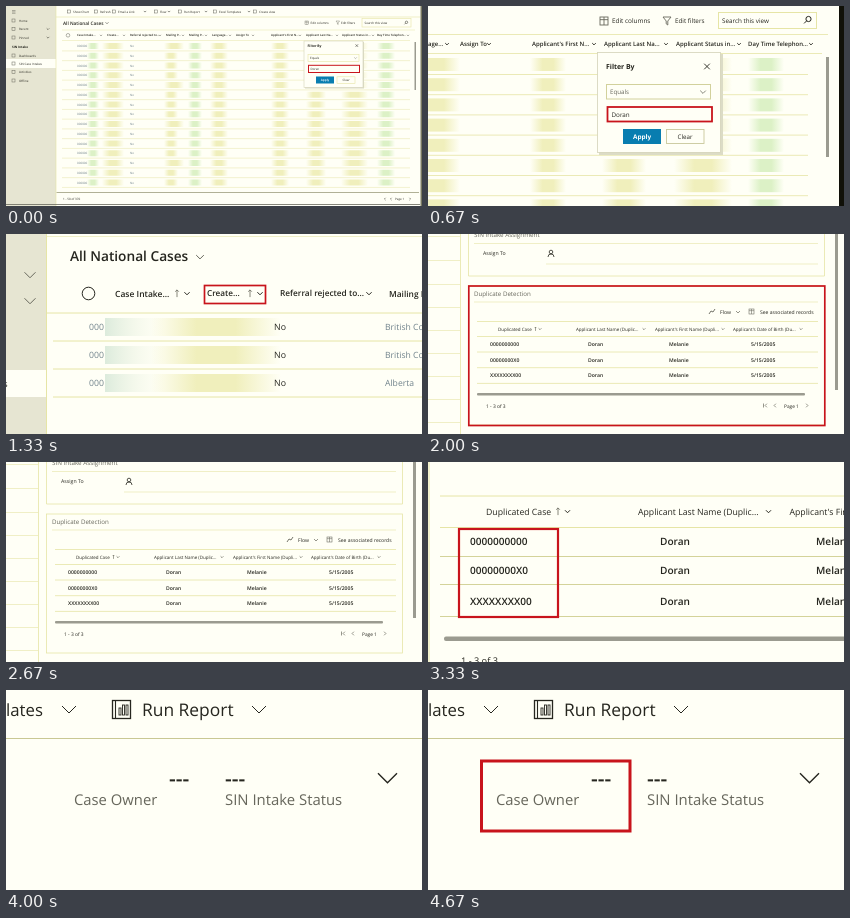
Animation of 416x200 px, one loop 5340 ms. Source, as an HTML page:

```html
<!DOCTYPE html>
<html lang="en">
<head>
<meta charset="utf-8">
<title>Case intake walkthrough</title>
<style>
html, body { margin: 0; width: 100%; height: 100%; overflow: hidden; background: #fffff6; }
svg { display: block; width: 416px; height: 200px; }
text { font-family: "Open Sans", "Noto Sans", sans-serif; text-rendering: geometricPrecision; white-space: pre; }
.on { opacity: 0; animation: 5340ms step-end infinite; }
.one { animation-name: one; }
.two { animation-name: two; }
@keyframes one { 0% { opacity: 1; } 12.547%, 100% { opacity: 0; } }
@keyframes two { 0% { opacity: 1; } 25.094%, 100% { opacity: 0; } }
</style>
</head>
<body>
<svg id="stage" viewBox="0 0 416 200"></svg>
<script>
const LOOP = 5340;
const PAGE = '#fffff6', INK = '#26261f', SOFT = '#67675c', SLATE = '#71838c', RULE = '#e6e5a6', TINT = '#e6e5d2';
const RED = '#c8141c', TEAL = '#087db0', BAR = '#9b9b90';
const LAST = 'Doran', FIRST = 'Melanie';

const rect = (x, y, w, h, fill, extra = '') =>
  `<rect x="${x}" y="${y}" width="${w}" height="${h}" fill="${fill}" ${extra}/>`;
const frame = (x, y, w, h, stroke, width = 1, fill = 'none') =>
  rect(x, y, w, h, fill, `stroke="${stroke}" stroke-width="${width}"`);
const path = (d, stroke = INK, width = 1) =>
  `<path d="${d}" fill="none" stroke="${stroke}" stroke-width="${width}"/>`;
const rule = (x, y, to, color = RULE, width = 1) => path(`M${x} ${y}H${to}`, color, width);
// y is the middle of the line
const text = (x, y, size, str, fill = INK, weight = 400) =>
  `<text x="${x}" y="${(y + size * 0.36).toFixed(2)}" font-size="${size}" fill="${fill}" font-weight="${weight}">${str}</text>`;
const chevron = (x, y, r, color = INK, width = 1) =>
  path(`M${x - r} ${y - r / 2}L${x} ${y + r / 2}L${x + r} ${y - r / 2}`, color, width);
const side = (x, y, r, dir, color = SOFT) =>
  path(`M${x - dir * r / 2} ${y - r}L${x + dir * r / 2} ${y}L${x - dir * r / 2} ${y + r}`, color, 0.7);
const upArrow = (x, y, r, width = 0.8) =>
  path(`M${x} ${y + r}V${y - r}M${x - r / 2} ${y - r / 2}L${x} ${y - r}L${x + r / 2} ${y - r / 2}`, SOFT, width);
const cross = (x, y, r, width) =>
  path(`M${x - r} ${y - r}L${x + r} ${y + r}M${x + r} ${y - r}L${x - r} ${y + r}`, INK, width);
const lens = (x, y, r, width) =>
  `<circle cx="${x}" cy="${y}" r="${r}" fill="none" stroke="${INK}" stroke-width="${width}"/>` +
  path(`M${x - r * 0.7} ${y + r * 0.7}l${-r} ${r}`, INK, width);
const gridIcon = (x, y, s) =>
  frame(x, y, s, s, SOFT, s / 9) + path(`M${x} ${y + s / 3}h${s}M${x + s / 2} ${y}v${s}`, SOFT, s / 9);
const funnel = (x, y, s) =>
  path(`M${x} ${y}h${s}l${-s * 0.4} ${s * 0.5}v${s * 0.5}l${-s * 0.2} ${-s * 0.15}v${-s * 0.35}z`, SOFT, s / 9);
const smudge = (x, y, w, h, kind = 'smudge') => rect(x, y - h / 2, w, h, `url(#${kind})`);
const fade = (id, color) => `<linearGradient id="${id}">` +
  [[0, 0], [0.35, 1], [0.65, 1], [1, 0]].map(([at, alpha]) =>
    `<stop offset="${at}" stop-color="${color}" stop-opacity="${alpha}"/>`).join('') + '</linearGradient>';
const range = (n, fn) => Array.from({ length: n }, (_, i) => fn(i)).join('');
const timed = (start, span, body) =>
  `<g class="on ${span}" style="animation-delay:${start - LOOP}ms">${body}</g>`;
const scene = (start, span, body) => timed(start, span, rect(0, 0, 416, 200, PAGE) + body);

function fullView() {
  const menu = [['Home', 14.5], ['Recent', 23], ['Pinned', 31.5], ['Dashboards', 49.5],
    ['SIN Case Intakes', 57.5], ['Activities', 66], ['Offline', 74.5]];
  const tools = [['Show Chart', 67], ['Refresh', 94], ['Email a Link', 112], ['Flow', 154],
    ['Run Report', 178], ['Excel Templates', 213], ['Create view', 253]];
  const heads = [['Case Intake...', 71], ['Create...', 101], ['Referral rejected to...', 124],
    ['Mailing P...', 160], ['Mailing P...', 183], ['Language...', 206], ['Assign To', 230],
    ['Applicant\'s First N...', 265], ['Applicant Last Na...', 300],
    ['Applicant Status in...', 336], ['Day Time Telephon...', 371]];
  const row = i => {
    const y = 40 + i * 9.75;
    return rule(56, y + 4.9, 404, RULE, 0.5) + text(71, y, 3, '000000', SLATE) +
      smudge(81, y, 12, 6, 'green') + smudge(96, y, 22, 6) + text(124, y, 3, 'No', SLATE) +
      smudge(158, y, i % 4 ? 14 : 20, 6) + smudge(182, y, 14, 6, 'green') + smudge(204, y, 18, 6) +
      smudge(265, y, 18, 6) + smudge(300, y, 20, 6) + smudge(335, y, 27, 6) + smudge(371, y, 18, 6, 'green');
  };
  return rect(0, 0, 50, 200, TINT) + rect(0, 53, 50, 9, PAGE) +
    path('M50 0V200', RULE, 0.6) + rule(50, 11, 414, RULE, 0.6) +
    range(3, i => rule(6, 4.5 + i * 1.4, 9.5, SOFT, 0.5)) +
    menu.map(([s, y]) => frame(6, y - 1.5, 3, 3, SOFT, 0.5) + text(13, y, 3, s)).join('') +
    text(6, 41, 3.1, 'SIN Intake', INK, 700) + chevron(42, 23, 1.3, INK, 0.5) + chevron(42, 31.5, 1.3, INK, 0.5) +
    tools.map(([s, x]) => frame(x - 5.5, 4, 3, 3, SOFT, 0.5) + text(x, 5.5, 3, s)).join('') +
    [139, 163, 200, 243].map(x => chevron(x, 5.5, 1.2, INK, 0.5)).join('') +
    text(57, 17, 4.7, 'All National Cases', INK, 600) + chevron(101, 17, 1.5, INK, 0.5) +
    gridIcon(299, 15, 3.6) + text(304.5, 17, 3.05, 'Edit columns') +
    funnel(330, 15, 3.6) + text(335, 17, 3.05, 'Edit filters') +
    frame(356, 12.5, 49, 8.5, RULE, 0.6) + text(358.5, 17, 3.05, 'Search this view') + lens(400.5, 16.3, 1.2, 0.5) +
    rule(56, 24, 409, RULE, 0.5) + rule(56, 34.5, 404, RULE, 0.5) +
    `<circle cx="62" cy="29.3" r="1.8" fill="none" stroke="${SOFT}" stroke-width=".5"/>` +
    heads.map(([s, x]) => text(x, 29.3, 2.9, s, INK, 600)).join('') +
    [95, 118, 154, 177, 200, 224, 247, 294, 331, 367, 402].map(x => chevron(x, 29.3, 0.9, INK, 0.5)).join('') +
    range(15, row) + rect(408.5, 36, 1.5, 48, BAR) +
    rule(50.5, 186.5, 413, '#a9a98c', 0.9) + text(57, 193, 3, '1 - 50 of 370') + text(389, 193, 3, 'Page 1') +
    side(379, 193, 1.2, -1) + side(385, 193, 1.2, -1) + side(404, 193, 1.2, 1) + rule(0, 198.5, 414, SOFT, 0.8) +
    rect(299, 36, 59, 46.5, '#dcdcc6') + rect(298, 35, 59, 46.5, PAGE, 'stroke="#d4d3b8" stroke-width=".6"') +
    text(301.5, 40, 3.4, 'Filter By', INK, 700) + cross(350.8, 39.6, 1.3, 0.5) +
    frame(302, 48.5, 51, 7, RULE, 0.6) + text(304, 52, 3, 'Equals') + chevron(349.5, 52, 1.3, SOFT, 0.4) +
    frame(302.5, 59.3, 51, 7.2, RED, 1) + text(304.5, 63, 3, LAST) +
    rect(310, 70.5, 18, 7, TEAL) + text(314.8, 74, 3.1, 'Apply', '#fff', 600) +
    frame(331, 70.8, 18, 6.6, RULE, 0.6, PAGE) + text(336.5, 74, 3, 'Clear') +
    rect(414.5, 0, 1.5, 200, '#77775f');
}

function filterView() {
  const heads = [['age...', 0, 19], ['Assign To', 32, 61], ['Applicant\'s First N...', 104, 166],
    ['Applicant Last Na...', 176, 238], ['Applicant Status in...', 248, 311], ['Day Time Telephon...', 320, 383]];
  const row = i => {
    const y = 58.5 + i * 20.2;
    return rule(0, y + 10, 380, RULE, 0.8) + smudge(-14, y, 46, 13) + smudge(102, y, 36, 13) +
      smudge(174, y, 44, 13) + smudge(246, y, 58, 13) + smudge(320, y, 36, 13, 'green');
  };
  return gridIcon(172, 11, 8) + text(184, 15, 6.4, 'Edit columns') +
    funnel(235, 11, 8) + text(247, 15, 6.3, 'Edit filters') +
    frame(290.5, 6.5, 98, 16, RULE, 1) + text(294, 15, 6.3, 'Search this view') + lens(380.5, 13, 2.6, 1) +
    rule(0, 28.5, 400, RULE, 0.8) + rule(0, 47.5, 394, RULE, 0.8) +
    heads.map(([s, x, c]) => text(x, 38, 6, s, INK, 600) + chevron(c, 38, 1.8, INK, 0.9)).join('') +
    range(8, row) + rect(398, 51, 3, 100, BAR) +
    rect(171, 48, 124, 101, '#dcdcc6') + rect(169.5, 46.5, 123, 100, PAGE, 'stroke="#d4d3b8" stroke-width=".8"') +
    text(178, 61, 6.9, 'Filter By', INK, 700) + cross(279, 60.5, 2.8, 0.9) +
    frame(178.5, 78.5, 104, 14.5, '#d2d19c', 1) + text(182, 86, 6.2, 'Equals', SOFT) + chevron(275, 86, 2.8, SOFT, 0.8) +
    frame(179.5, 101, 104.5, 14.5, RED, 1.8) + text(183.5, 109, 6.3, LAST) +
    rect(195, 123, 38, 15, TEAL) + text(205, 130.8, 6.4, 'Apply', '#fff', 700) +
    frame(238.5, 123.5, 37.5, 14, '#c9c89c', 0.9, PAGE) + text(249.5, 130.8, 6.2, 'Clear') +
    rect(411, 0, 5, 200, '#101008');
}

function sortView() {
  const row = (place, i) => {
    const y = 93 + i * 28;
    return rule(47, y + 14, 416, RULE) + text(83, y, 8.7, '000', SLATE) +
      rect(99, y - 9, 60, 18, 'url(#mint)') + smudge(145, y, 130, 18) +
      text(268, y, 8.8, 'No') + text(379, y, 8.6, place, SLATE);
  };
  return rect(0, 0, 41, 200, TINT) + rect(0, 136, 41, 27, PAGE) + path('M40.5 0V200', RULE) + rule(41, 2.5, 416, RULE, 0.6) +
    chevron(24, 41, 5.5, SOFT) + chevron(24, 67, 5.5, SOFT) + text(-2.5, 150, 8.6, 's') +
    text(64, 22.5, 13.7, 'All National Cases', INK, 600) + chevron(194, 23, 3.8, SOFT) +
    `<circle cx="82.5" cy="59.5" r="6.3" fill="none" stroke="${INK}"/>` +
    text(109, 59.5, 8.5, 'Case Intake...', INK, 600) + upArrow(171, 59.5, 3.6) + chevron(181, 59.5, 2.6) +
    text(201, 59.5, 8.2, 'Create...', INK, 600) + upArrow(244, 59.5, 3.6) + chevron(254, 59.5, 2.6) +
    frame(198.5, 51.5, 61, 18, RED, 1.7) +
    text(274, 59.5, 8.3, 'Referral rejected to...', INK, 600) + chevron(363, 59.5, 2.6) +
    text(383, 59.5, 8.4, 'Mailing P...', INK, 600) + rule(41, 79, 416, RULE) +
    ['British Columbia', 'British Columbia', 'Alberta'].map(row).join('');
}

const CASES = ['0000000000', '00000000X0', 'XXXXXXXX00'];

function formView() {
  const heads = [['Duplicated Case', 70, 112], ['Applicant Last Name (Duplic...', 148, 216],
    ['Applicant\'s First Name (Dupli...', 227, 295], ['Applicant\'s Date of Birth (Du...', 305, 373]];
  const row = (id, i) => {
    const y = 110 + i * 15.7;
    return rule(49, y + 8, 390, RULE, 0.8) + text(62, y, 5.1, id, INK, 600) + text(160, y, 5.1, LAST, INK, 600) +
      text(241, y, 5.1, FIRST, INK, 600) + text(323, y, 5.1, '5/15/2005', INK, 600);
  };
  return path('M32.5 0V200M40.5 0V42H396.5V0', RULE, 0.8) +
    [2, 26, 50, 73, 96, 119, 142, 165, 188].map(y => rule(0, y + 0.5, 32, RULE, 0.6)).join('') +
    text(46, 1, 6.3, 'SIN Intake Assignment', SOFT) + rule(46, 9.5, 390, RULE, 0.6) +
    text(55, 19.5, 5.2, 'Assign To') + rule(118, 30, 390, RULE, 0.6) +
    `<circle cx="123" cy="18" r="1.8" fill="none" stroke="${INK}" stroke-width=".8"/>` + path('M120 23q0-3 3-3t3 3', INK, 0.8) +
    frame(40.5, 52, 356, 139, RULE, 0.8) + text(46, 60, 6.2, 'Duplicate Detection', SOFT) +
    rule(46, 68, 390, RULE, 0.6) +
    path('M281 80l2-3 2 1 2-3', SOFT, 0.9) + text(292, 78, 5.1, 'Flow') + chevron(310, 78, 2, SOFT, 0.7) +
    gridIcon(321, 75, 5) + text(332, 78, 5.05, 'See associated records') +
    rule(49, 87.5, 390, RULE, 0.8) + rule(49, 102.5, 390, RULE, 0.8) +
    heads.map(([s, x, c]) => text(x, 95, 4.5, s) + chevron(c, 95, 1.4, SOFT, 0.7)).join('') + upArrow(107.5, 95, 1.9, 0.6) +
    CASES.map(row).join('') + rect(49, 159, 328, 2.4, BAR, 'rx="1"') +
    text(58, 172, 4.9, '1 - 3 of 3') + path('M335.5 169.5v4', SOFT, 0.7) + side(338, 171.5, 1.8, -1) + side(347, 171.5, 1.8, -1) +
    text(356, 172, 4.8, 'Page 1') + side(379, 171.5, 1.8, 1) +
    rect(407, 0, 3, 156, BAR) +
    timed(2000, 'one', frame(40.8, 52, 356, 139.5, RED, 1.7));
}

function caseView() {
  const row = (id, i) => {
    const y = [79, 108, 139.5][i];
    return rule(12, [94.5, 122.5, 154.5][i], 416, '#d4d39a') + text(42, y, 10.1, id, INK, 600) +
      text(232, y, 10.1, LAST, INK, 600) + text(388, y, 10.1, FIRST, INK, 600);
  };
  return path('M1 0V200', RULE) + rule(12, 34, 416, RULE) + rule(12, 65.5, 416, RULE) +
    text(58, 49.5, 8.7, 'Duplicated Case') + upArrow(130, 49.5, 3.6) + chevron(139.5, 49.5, 2.5) +
    text(210, 49.5, 8.7, 'Applicant Last Name (Duplic...') + chevron(340.5, 49.5, 2.5) +
    text(361.5, 49.5, 8.7, 'Applicant\'s First Name') +
    CASES.map(row).join('') + rect(16, 174.5, 404, 4.6, BAR, 'rx="2"') +
    text(33, 199, 9.2, '1 - 3 of 3') + frame(31, 67, 99, 88, RED, 2.2);
}

function ownerView() {
  return text(0, 20, 16.8, 'lates') + chevron(63, 19.5, 7) +
    frame(106.5, 10.5, 18, 18, INK, 1.3) + path('M109.5 10V29', INK, 1.1) +
    [[113, 18, 7], [116.5, 15, 10], [120, 15, 10]].map(([x, y, h]) => frame(x, y, 2, h, INK, 0.9)).join('') +
    text(136, 20, 17.4, 'Run Report') + chevron(253, 19.5, 7) + rule(0, 48.5, 416, '#c9c893') +
    text(163, 88, 21, '---', INK, 600) + text(219, 88, 21, '---', INK, 600) +
    text(68, 110, 14.8, 'Case Owner', SOFT) + text(219, 110, 14.9, 'SIN Intake Status', SOFT) +
    chevron(381.5, 88, 9.5, INK, 1.4) +
    timed(4670, 'one', frame(53.5, 71, 148.5, 70, RED, 3));
}

const mint = '<linearGradient id="mint"><stop offset="0" stop-color="#dcebdc"/>' +
  '<stop offset="1" stop-color="#f6f8e6" stop-opacity="0"/></linearGradient>';

document.getElementById('stage').innerHTML =
  `<defs>${fade('smudge', '#f0efbc')}${fade('green', '#dcf1c6')}${mint}</defs>` +
  scene(0, 'one', fullView()) +
  scene(670, 'one', filterView()) +
  scene(1330, 'one', sortView()) +
  scene(2000, 'two', formView()) +
  scene(3330, 'one', caseView()) +
  scene(4000, 'two', ownerView());
</script>
</body>
</html>
```
